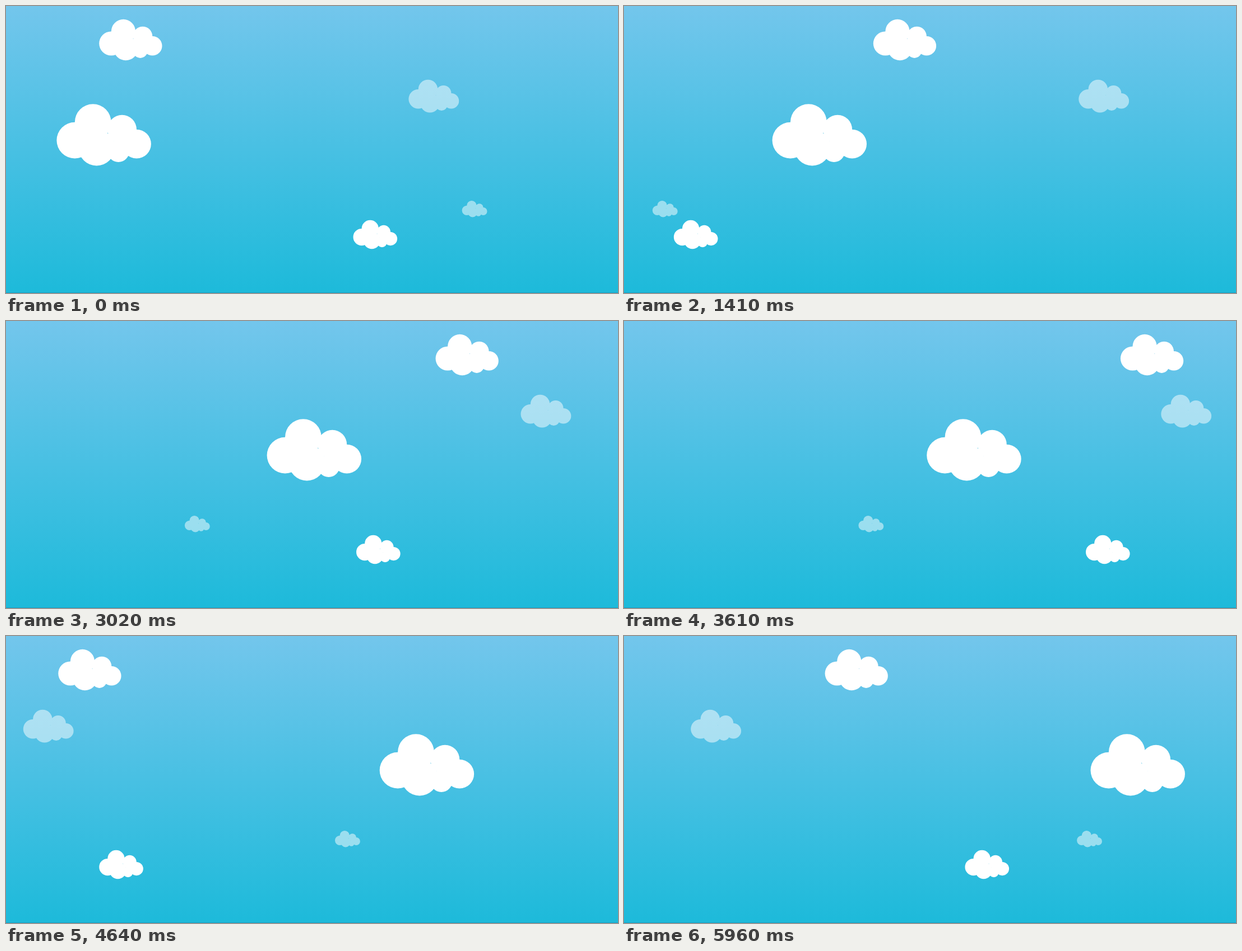
Write an HTML page with a canvas that moves like this. It is 1092 px wide and 513 px high and loops after 6040 ms.

```html
<!DOCTYPE html>
<html lang="en">
<head>
<meta charset="utf-8">
<title>Drifting clouds</title>
<style>
  html, body { margin: 0; width: 100%; height: 100%; overflow: hidden; background: #1fbada; }
  canvas { display: block; }
</style>
</head>
<body>
<canvas id="sky" width="1092" height="513"></canvas>
<script>
const WIDTH = 1092, HEIGHT = 513, LOOP = 6040;
const TICK = 1000 / 60;
const LAST_STEP = 89;
const TRAVEL = 995; // distance a cloud drifts before it wraps
const UNIT = 8.64;  // cloud grid size at scale 1

const ctx = document.getElementById("sky").getContext("2d");

// Circles of one cloud in grid units: x, y, radius
const PUFFS = [[5, 10, 5], [10, 5, 5], [11, 12, 5], [18, 7, 4], [22, 11, 4], [17, 13, 3]];

// x is the left edge at the start, seconds the time for one full travel
const CLOUDS = [
  { x: 166.2, y: 23.8, scale: 0.5, seconds: 5, alpha: 1 },
  { x: 718.4, y: 131.7, scale: 0.4, seconds: 15, alpha: 0.5 },
  { x: 90.4, y: 175.3, scale: 0.75, seconds: 8, alpha: 1 },
  { x: 813.6, y: 348, scale: 0.2, seconds: 6, alpha: 0.5 },
  { x: 619.5, y: 382.8, scale: 0.35, seconds: 3, alpha: 1 }
];

const mod = (a, n) => ((a % n) + n) % n;

// The picture steps every fourth tick and slips by one tick twice per loop
const stepTick = n => 4 * n + (n > 40) + (n > 64);

function driftAt(time) {
  const tick = Math.floor(time / TICK) + 1;
  let n = 0;
  while (n < LAST_STEP && stepTick(n + 1) <= tick) n++;
  return stepTick(n) * TICK / 1000;
}

const skyFill = ctx.createLinearGradient(0, 0, 0, HEIGHT);
skyFill.addColorStop(0, "#73c6ec");
skyFill.addColorStop(1, "#1dbada");

function drawSky() {
  ctx.globalAlpha = 1;
  ctx.fillStyle = skyFill;
  ctx.fillRect(0, 0, WIDTH, HEIGHT);
  ctx.fillStyle = "#189fc2";
  ctx.fillRect(0, HEIGHT - 1, WIDTH, 1);
}

function drawCloud({ x, y, scale, seconds, alpha }, drift) {
  const start = 38 - 104 * scale; // larger clouds enter further left
  const left = start + mod(x + TRAVEL * drift / seconds - start, TRAVEL);
  const u = UNIT * scale;
  ctx.globalAlpha = alpha;
  ctx.fillStyle = "#fff";
  ctx.beginPath();
  for (const [px, py, r] of PUFFS) {
    ctx.moveTo(left + (px + r) * u, y + py * u);
    ctx.arc(left + px * u, y + py * u, r * u, 0, Math.PI * 2);
  }
  ctx.fill();
}

function render() {
  const drift = driftAt(performance.now() % LOOP);
  drawSky();
  for (const cloud of CLOUDS) drawCloud(cloud, drift);
  requestAnimationFrame(render);
}
render();
</script>
</body>
</html>
```
